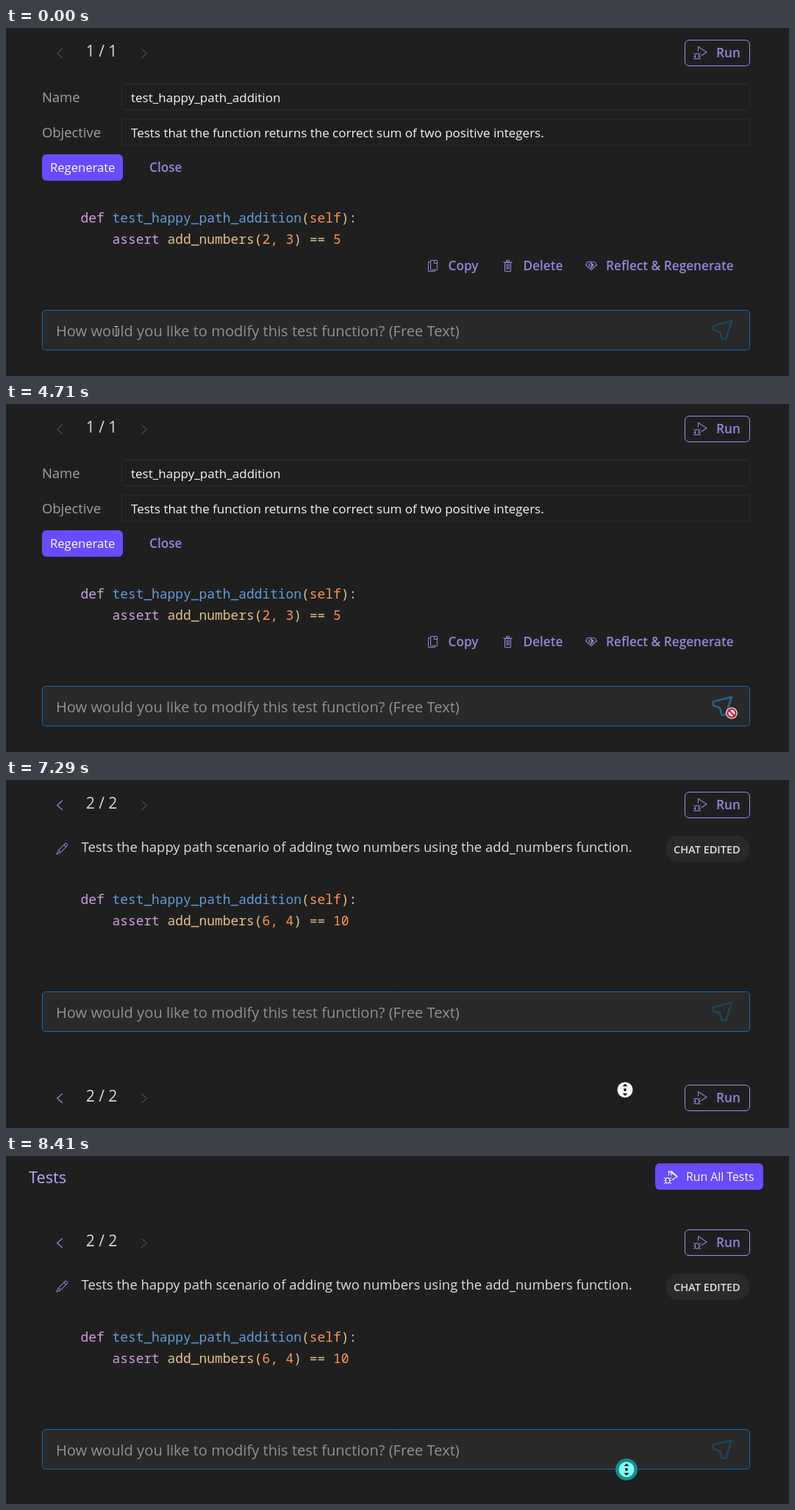
An HTML page with a canvas for the animation above (8.48 s loop, 1065x474 px).

```html
<!DOCTYPE html>
<html lang="en">
<head>
<meta charset="utf-8">
<title>Test editor</title>
<style>
html, body { margin: 0; width: 100%; height: 100%; overflow: hidden; background: #1f1f1f; }
canvas { display: block; }
</style>
</head>
<body>
<canvas id="stage" width="1065" height="474"></canvas>
<script>
const ctx = document.getElementById('stage').getContext('2d');
const LOOP = 8480, KEY = 80, BLINK = 470;
const FOCUS = 290, SUBMIT = 4590, LOADING = 4790, DONE = 5950, PAN = 7220, CLICK = 8410;
const BG = '#1f1f1f', VIOLET = '#6a4bff', LILAC = '#9585da', EDGE = '#a08cf5', DIM = '#4b4660';
const SANS = '"Open Sans", "Noto Sans", sans-serif';
const MONO = '"Noto Sans Mono", "DejaVu Sans Mono", monospace';
const CODE = { kw: '#d19fdd', fn: '#639bdc', id: '#e5c18b', num: '#fe9558', pun: '#dccfbc' };
const HINT = 'How would you like to modify this test function? (Free Text)';
// bursts of typing: start time and characters
const BURSTS = [[800, 'use '], [1170, '6 and '], [1750, '4 a'], [2040, 's the inpu'], [3030, 'ts']];
// pointer moves: start, end, destination
const REST = [150, 413];
const MOVES = [
  [3580, 4300, 987, 421], [4780, 5400, 944, 422], [5560, 6200, 838, 448],
  [7100, PAN, 842, 422], [7400, 7600, 844, 385], [7960, 8120, 844, 427]
];

const ramp = (t, a, b) => Math.min(1, Math.max(0, (t - a) / (b - a)));
const ease = p => p * p * (3 - 2 * p);
const scroll = t => 84 * ramp(t, 7425, 8120) ** 1.2;

function mix(a, b, p) {
  const ch = (s, i) => parseInt(s.substr(1 + 2 * i, 2), 16);
  return `rgb(${[0, 1, 2].map(i => Math.round(ch(a, i) + (ch(b, i) - ch(a, i)) * p))})`;
}

function text(s, x, y, size, color, weight = 400, family = SANS) {
  ctx.font = `${weight} ${size}px ${family}`;
  ctx.fillStyle = color;
  ctx.fillText(s, x, y);
}

function paint(fill, edge, width) {
  if (fill) { ctx.fillStyle = fill; ctx.fill(); }
  if (!edge) return;
  ctx.lineJoin = ctx.lineCap = 'round';
  ctx.strokeStyle = edge;
  ctx.lineWidth = width;
  ctx.stroke();
}

function box(x, y, w, h, r, fill, edge) {
  const k = edge ? 0.5 : 0;
  ctx.beginPath();
  ctx.roundRect(x + k, y + k, w - 2 * k, h - 2 * k, Math.max(0, r - k));
  paint(fill, edge, 1);
}

function line(pts, color, width = 1.1) {
  ctx.beginPath();
  for (let i = 0; i < pts.length; i += 2) ctx.lineTo(pts[i], pts[i + 1]);
  paint(null, color, width);
}

function shape(pts, fill, edge, width = 1.1) {
  ctx.beginPath();
  for (let i = 0; i < pts.length; i += 2) ctx.lineTo(pts[i], pts[i + 1]);
  ctx.closePath();
  paint(fill, edge, width);
}

function oval(x, y, rx, ry, fill, edge, width = 1.1) {
  ctx.beginPath();
  ctx.ellipse(x, y, rx, ry, 0, 0, 2 * Math.PI);
  paint(fill, edge, width);
}

const disc = (x, y, r, fill, edge, width) => oval(x, y, r, r, fill, edge, width);

function at(x, y, draw, angle = 0) {
  ctx.save();
  ctx.translate(x, y);
  ctx.rotate(angle);
  draw();
  ctx.restore();
}

function faded(alpha, draw) {
  ctx.save();
  ctx.globalAlpha *= alpha;
  draw();
  ctx.restore();
}

function debugIcon(color, twin) {
  line([6.5, 6, 6.5, 0.5, 18, 8, 11, 12.5], color);
  if (twin) line([10, 6, 10, 0.5, 18, 8], color);
  oval(5, 13.5, 2.7, 3.7, null, color);
  for (const y of [-3, 0, 3])
    for (const s of [-1, 1]) line([5 + 2.4 * s, 13.5 + y * 0.8, 5 + 4.6 * s, 13.5 + y * 1.3], color);
}

function copyIcon() {
  box(1, 2, 10, 14, 1, null, LILAC);
  box(4, 0, 10, 14, 1, BG, LILAC);
  line([9.5, 1, 9.5, 4.5, 13, 4.5], LILAC);
}

function trashIcon() {
  line([0.5, 3, 12.5, 3], LILAC);
  box(4, 0, 5, 3, 1, null, LILAC);
  box(2, 3, 9, 13, 1, null, LILAC);
  for (const x of [4.7, 6.5, 8.3]) line([x, 5.5, x, 12.5], LILAC, 0.9);
}

function gemIcon() {
  shape([3.5, 0.5, 12.5, 0.5, 15.5, 4.5, 8, 11.5, 0.5, 4.5], null, LILAC);
  shape([5, 4.5, 8, 2, 11, 4.5, 8, 9], null, LILAC);
  shape([8, 2, 11, 4.5, 8, 9], LILAC);
}

function pencilIcon() {
  box(-2.5, -10, 5, 15, 2, null, LILAC);
  line([-2, 5, 0, 10, 2, 5], LILAC);
  line([-2, -6, 2, -6], LILAC);
}

function sendIcon(color) {
  shape([987, 15, 979, 39.5, 973.5, 39.5, 971, 30, 961.8, 26.5, 961.8, 21.5], null, color, 2.6);
}

function chevron(x, dir, color) {
  line([x - 3.5 * dir, 28.5, x + 3.5 * dir, 34.5, x - 3.5 * dir, 40.5], color, 1.3);
}

function header(label, prev, next) {
  chevron(73, -1, prev);
  chevron(label ? 188 : 191, 1, next);
  text(label, 108.7, 39, 21, '#dadada');
}

function runButton(alpha = 1) {
  faded(0.4 + 0.6 * alpha, () => box(923, 16, 89, 36, 6, null, EDGE));
  faded(alpha, () => {
    at(935, 25, () => debugIcon(LILAC));
    text('Run', 966, 40, 17.2, LILAC, 600);
  });
}

function dots(t) {
  for (let i = 0; i < 3; i++) {
    const p = 0.5 + 0.5 * Math.cos((t - 5510) / 190 - (i - 1) * 1.5);
    disc(117 + 14.5 * i, 32, 3.9 + 0.6 * p, mix('#40318c', '#5c40d2', p));
  }
}

function field(y, label, value) {
  text(label, 49, y + 25, 18.4, '#a2a2a2');
  box(157, y, 855, 36, 3, null, '#2c2c2c');
  text(value, 170, y + 25, 17, '#f6f6f6');
}

function fields() {
  field(76, 'Name', 'test_happy_path_addition');
  field(124, 'Objective', 'Tests that the function returns the correct sum of two positive integers.');
}

function editActions() {
  const action = (label, x, y = 330) => text(label, x, y, 17.2, LILAC, 600);
  box(49, 172, 110, 36, 6, VIOLET);
  text('Regenerate', 60, 196, 16.6, '#fff');
  action('Close', 195, 196);
  at(573, 316, copyIcon);
  action('Copy', 601.5);
  at(676, 316, trashIcon);
  action('Delete', 703.5);
  at(788, 318, gemIcon);
  action('Reflect & Regenerate', 816);
}

function code(y, a, b) {
  const rows = [
    { 'def ': 'kw', test_happy_path_addition: 'fn', '(': 'id', self: 'num', ')': 'id', ':': 'pun' },
    { '    assert ': 'kw', 'add_numbers(': 'id', [`${a}, ${b}`]: 'num', ') == ': 'id', [` ${a + b}`]: 'num' }
  ];
  rows.forEach((row, i) => {
    let x = 101.5;
    for (const [s, kind] of Object.entries(row)) {
      text(s.replace(/^ (?=\d)/, ''), x, y + 29 * i, 17.9, CODE[kind], 500, MONO);
      x += ctx.measureText(s).width;
    }
  });
}

function summary() {
  at(76, 94, pencilIcon, Math.PI / 4);
  text('Tests the happy path scenario of adding two numbers using the add_numbers function.',
    102.5, 98, 18.43, '#dedede');
  box(897, 76, 115, 36, 18, '#2a2a2a');
  text('CHAT EDITED', 908, 99.5, 14.5, '#e0e0e0', 600);
}

function typing(t) {
  let s = '', last = FOCUS;
  for (const [from, chars] of BURSTS) {
    if (t < from) break;
    const n = Math.min(chars.length, 1 + Math.floor((t - from) / KEY));
    s += chars.slice(0, n);
    last = from + (n - 1) * KEY;
  }
  const caret = t >= 240 && Math.floor((t - last + 180) / BLINK) % 2 === 0;
  return { s, caret };
}

function prompt(t) {
  const idle = t >= SUBMIT;
  const { s, caret } = idle ? { s: '', caret: false } : typing(t);
  const focus = idle ? 1 - ramp(t, SUBMIT, SUBMIT + 100) : ramp(t, 200, 360);
  const icon = idle ? mix('#2f80bd', '#20435a', ramp(t, SUBMIT, SUBMIT + 240))
    : mix('#20435a', '#8a8a8a', ramp(t, 780, 920));
  box(49, 0, 963, 55, 5, mix('#292929', BG, focus), mix('#0f6fc0', VIOLET, focus));
  text(s || HINT, 68, 36, 20.1, s ? '#d6d6d6' : '#929292');
  if (caret) {
    const x = s ? Math.round(68 + ctx.measureText(s).width) : 69;
    ctx.fillStyle = '#fff';
    ctx.fillRect(x, 13, 1, 28);
  }
  sendIcon(icon);
}

function disabledPrompt() {
  box(49, 0, 963, 52, 5, '#303030');
  text(HINT, 66.5, 35, 20.1, '#9a9a9a');
  sendIcon('#2f80bd');
}

function editView(t) {
  header('1 / 1', DIM, DIM);
  runButton();
  fields();
  editActions();
  code(265, 2, 3);
  at(0, 384, () => prompt(t));
}

function loadingView(t) {
  const alpha = 1 - 0.6 * ramp(t, LOADING, LOADING + 200);
  header('', '#6b6779', '#6b6779');
  dots(t);
  runButton(alpha);
  faded(alpha, () => {
    fields();
    at(0, 336, disabledPrompt);
  });
  code(217, 2, 3);
}

function resultView(t) {
  const alpha = 0.4 + 0.6 * ramp(t, DONE, DONE + 240);
  header('2 / 2', LILAC, DIM);
  runButton(alpha);
  faded(alpha, () => {
    summary();
    at(0, 288, () => prompt(t));
  });
  code(169, 6, 4);
}

function toolbar() {
  text('Tests', 31, -47, 21.7, '#b9a8ff');
  box(883, -74, 147, 36, 6, VIOLET);
  at(895, -64, () => debugIcon('#fff', true));
  text('Run All Tests', 925, -50, 15.8, '#fff');
}

function iBeam() {
  for (const [color, width] of [['#111', 2.6], ['#d8d8d8', 1]]) {
    line([0, -6.5, 0, 6.5], color, width);
    for (const y of [-6.5, 6.5]) line([-2.5, y, 2.5, y], color, width);
  }
}

function arrow() {
  line([4, 10, 7, 16], '#000', 4);
  shape([0, 0, 0, 15, 4, 11.5, 10.8, 10.8], '#fff', '#000', 1);
  line([4, 10, 7, 16], '#fff', 2);
}

function hand() {
  box(-5, 9, 15, 13, 4, '#fff', '#000');
  box(-2, 0, 4, 14, 2, '#fff', '#000');
}

function noEntry() {
  disc(0, 0, 7.8, '#fff');
  disc(0, 0, 5.6, null, '#c8102e', 2.2);
  line([-4, -4, 4, 4], '#c8102e', 2.2);
}

function panMark(fill) {
  disc(0, 0, 10.5, fill);
  disc(0, 0, 1.9, '#111');
  for (const s of [-1, 1]) shape([-3.5, 4.8 * s, 3.5, 4.8 * s, 0, 8.3 * s], '#111');
}

function panUp() {
  shape([-4, -2, 0, -5.5, 4, -2], '#111', '#fff', 1.3);
  disc(0, 3, 2.6, '#111', '#fff', 1.3);
}

function pointer(t) {
  let [x, y] = REST;
  for (const [from, to, tx, ty] of MOVES) {
    const p = ease(ramp(t, from, to));
    x += (tx - x) * p;
    y += (ty - y) * p;
  }
  at(x, y, () => {
    if (t < SUBMIT) x < 955 ? iBeam() : hand();
    else if (t < LOADING) noEntry();
    else if (t < PAN) arrow();
    else if (t >= 7440 && t < 8080) panUp();
    else {
      if (t >= CLICK) disc(0, 0, 15, '#128f8b');
      panMark(t >= CLICK ? '#84fbf6' : '#fff');
    }
  });
}

function draw(t) {
  ctx.fillStyle = BG;
  ctx.fillRect(0, 0, 1065, 474);
  at(0, scroll(t), () => {
    toolbar();
    const [view, gap] = t < LOADING ? [editView, 492] : t < DONE ? [loadingView, 444] : [resultView, 399];
    view(t);
    at(0, gap, () => {
      header('2 / 2', LILAC, DIM);
      runButton();
    });
  });
  pointer(t);
}

const start = performance.now();
function tick() {
  draw((performance.now() - start) % LOOP);
  requestAnimationFrame(tick);
}
tick();
</script>
</body>
</html>
```
